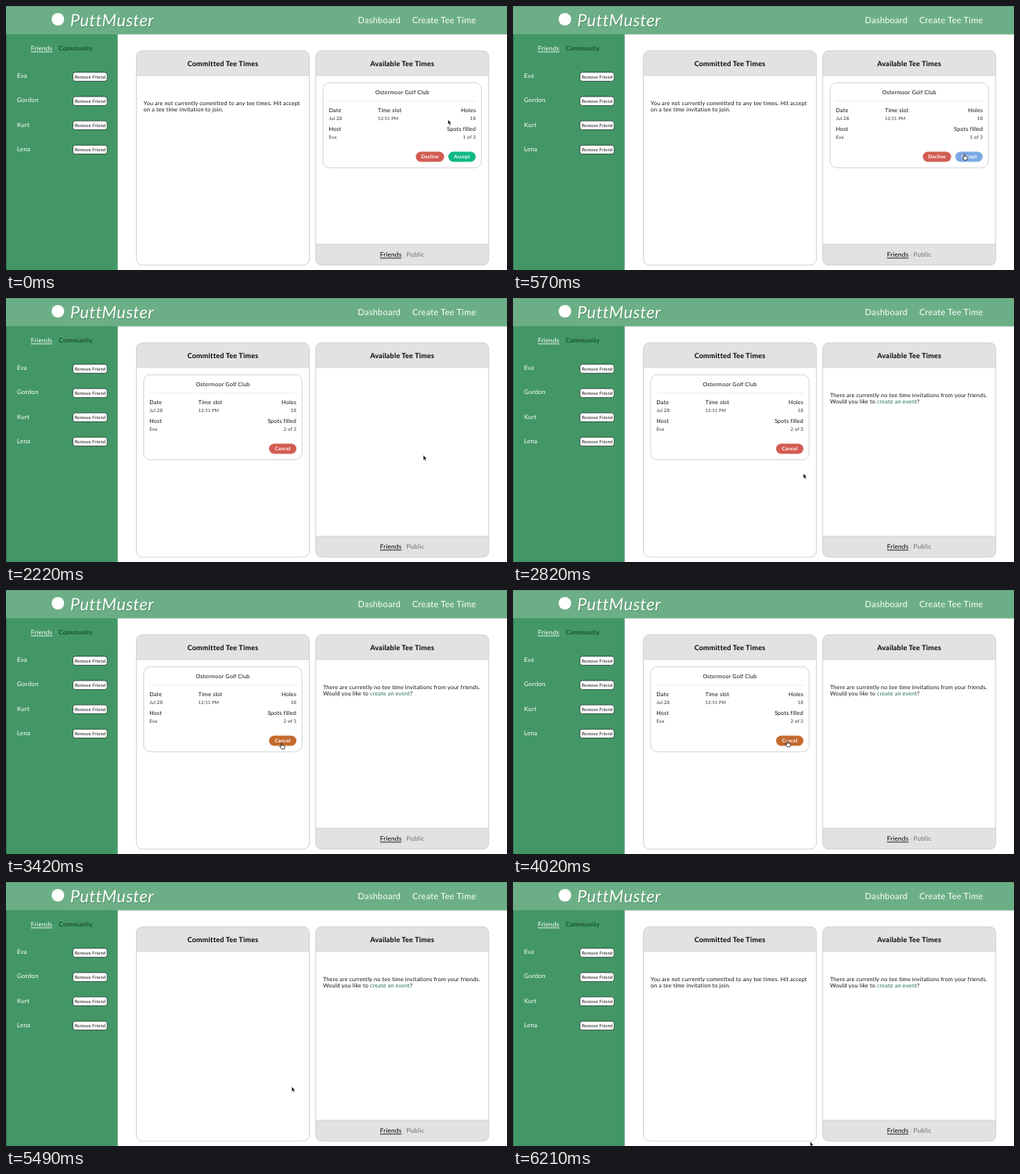
An HTML page for the animation above (6.24 s loop, 640 px wide and 338 px high).

```html
<!DOCTYPE html>
<html lang="en">
<head>
<meta charset="utf-8">
<title>Tee times</title>
<style>
  html, body { margin: 0; width: 100%; height: 100%; overflow: hidden; background: #fff; }
  svg { display: block; width: 640px; height: 338px; }
  text {
    font: 400 7.2px Lato, "Open Sans", sans-serif;
    letter-spacing: .0235em;
    text-rendering: geometricPrecision;
    fill: #111;
  }
  .bold { font-weight: 700; }
  .white { fill: #fff; }
  .under { text-decoration: underline; }
  .mid { text-anchor: middle; }
  .end { text-anchor: end; }
  .soft { filter: drop-shadow(0 .6px .6px rgba(0, 0, 0, .2)); }
</style>
</head>
<body>
<svg id="stage" viewBox="0 0 640 338" xmlns="http://www.w3.org/2000/svg"></svg>
<script>
const LOOP = 6240;
const JOIN = 1740, NO_INVITES = 2400, LEAVE = 4920, NO_PLANS = 5550;
const RED = '#d25c52', GREEN = '#0fb983', BLUE = '#7ba9e5', ORANGE = '#c5692d';
const GREY = '#e3e1e2';
const PITCH = 229.2;

const label = (x, y, str, size = 7.2, cls = '', style = '') =>
  `<text x="${x}" y="${y}" class="${cls}" style="font-size:${size}px;${style}">${str}</text>`;

const box = (x, y, w, h, r, attrs) =>
  `<rect x="${x}" y="${y}" width="${w}" height="${h}" rx="${r}" ${attrs}/>`;

const group = (id, body, x = 0) => `<g id="${id}" transform="translate(${x} 0)">${body}</g>`;

const pill = (id, x, w, str, color) =>
  box(x, 186.5, w, 13, 6.5, `id="${id}" fill="${color}"`) +
  label(x + w / 2, 195.3, str, 6.4, 'bold white mid');

function friend(name, i) {
  const y = 90.6 + i * 31.1;
  return label(14, y + 1.7, name, 8, 'white') +
    box(85.5, y - 5.7, 43.7, 11.4, 3, 'fill="#fff" stroke="#1c3b2a" stroke-width=".8"') +
    label(107.4, y + 2.1, 'Remove Friend', 5.75, 'mid');
}

function panel(x, title, foot) {
  const edge = 'fill="none" stroke="#d0d0d0" stroke-width=".9"';
  return box(x, 57.3, 221, 274.6, 8, 'fill="#fff" class="soft"') +
    `<path d="M${x} 89V65.3q0-8 8-8h205q8 0 8 8V89z" fill="${GREY}"/>` +
    (foot ? `<path d="M${x} 305v18.9q0 8 8 8h205q8 0 8-8V305z" fill="${GREY}"/>` +
      `<path d="M${x} 305h221" ${edge}/>` : '') +
    `<path d="M${x} 89h221" ${edge}/>` +
    box(x, 57.3, 221, 274.6, 8, edge) +
    label(x + 110.5, 76.6, title, 9, 'bold mid', 'fill:#000');
}

// Drawn in the left panel's coordinates.
const card = (spots, buttons) =>
  box(176, 98.3, 202, 108.6, 8, 'fill="#fff" stroke="#dadada" stroke-width=".9" class="soft"') +
  label(277, 113, 'Ostermoor Golf Club', 7.2, 'mid') +
  '<path d="M183 121.7H371" stroke="#e4e4e4" stroke-width=".8"/>' +
  label(183.3, 136.1, 'Date') + label(183.3, 145.7, 'Jul 28', 6.1, '', 'fill:#333') +
  label(245.8, 136.1, 'Time slot') + label(245.8, 145.7, '12:51 PM', 5.8, '', 'fill:#333') +
  label(371, 136.1, 'Holes', 7.2, 'end') + label(371, 145.7, '18', 6.1, 'end', 'fill:#333') +
  label(183.3, 160.1, 'Host') + label(183.3, 169.9, 'Eva', 6.1, '', 'fill:#333') +
  label(371, 160.1, 'Spots filled', 7.2, 'end') +
  label(371, 169.9, spots, 6.1, 'end', 'fill:#333') + buttons;

const topBar =
  box(0, 0, 640, 36.3, 0, 'fill="#6caf86" class="soft"') +
  box(0, 0, 640, 1, 0, 'fill="#00301a" opacity=".12"') +
  '<circle cx="66.3" cy="17" r="8" fill="#fff"/>' +
  label(82.7, 26.7, 'PuttMuster', 21.6, '', 'font-style:italic;fill:rgba(20,70,40,.35)') +
  label(82, 26, 'PuttMuster', 21.6, 'white', 'font-style:italic') +
  label(449.5, 21.8, 'Dashboard', 11, 'white') +
  label(519, 21.8, 'Create Tee Time', 11, 'white');

const sideBar =
  box(0, 36, 142.6, 302, 0, 'fill="#439766" class="soft"') +
  box(0, 36, 1, 302, 0, 'fill="#00301a" opacity=".3"') +
  label(31.7, 57.4, 'Friends', 8.2, 'white under') +
  '<path d="M63.8 50.5v8" stroke="#5fa67d" stroke-width=".7"/>' +
  label(67.3, 57.4, 'Community', 8.2, '', 'fill:#0d3a22') +
  ['Eva', 'Gordon', 'Kurt', 'Lena'].map(friend).join('');

const footer =
  label(477.8, 321.4, 'Friends', 8.2, 'under', 'fill:#000') +
  '<path d="M508.8 314.5v8.5" stroke="#cfcdce" stroke-width=".7"/>' +
  label(511.5, 321.4, 'Public', 8.2, '', 'fill:#6f6d6e');

const noPlans =
  label(175.8, 126.5, 'You are not currently committed to any tee times. Hit accept') +
  label(175.8, 135.3, 'on a tee time invitation to join.');

const noInvites =
  label(405, 126.5, 'There are currently no tee time invitations from your friends.') +
  label(405, 135.3, 'Would you like to <tspan fill="#23704a">create an event</tspan>?');

const arrow = '<path d="M0 0v6.2l1.4-1.2 1 2.3 1.1-.5-1-2.2h1.9z" ' +
  'fill="#000" stroke="#fff" stroke-width=".5"/>';
const hand = '<path d="M-.7 .6q.7-1 1.3 0V3.2l2.6.5q1 .3.8 1.4L3.4 8H-.2L-2.4 5q-.3-1 .6-.9l1.1.8z" ' +
  'fill="#fff" stroke="#000" stroke-width=".7" stroke-linejoin="round"/>';

const stage = document.getElementById('stage');
stage.innerHTML = sideBar + topBar +
  panel(166.5, 'Committed Tee Times', false) + panel(395.7, 'Available Tee Times', true) + footer +
  group('noPlans', noPlans) + group('noInvites', noInvites) +
  group('invite', card('1 of 3',
    pill('decline', 294.3, 36.2, 'Decline', RED) + pill('accept', 335.8, 35, 'Accept', GREEN)), PITCH) +
  group('plan', card('2 of 3', pill('cancel', 336, 35, 'Cancel', RED))) +
  group('cursor', group('arrow', arrow) + group('hand', hand));

const el = id => document.getElementById(id);
const [noPlansEl, noInvitesEl, invite, plan, accept, cancel, cursor, arrowEl, handEl] =
  ['noPlans', 'noInvites', 'invite', 'plan', 'accept', 'cancel', 'cursor', 'arrow', 'hand'].map(el);

// Pointer stops: time, x, y
const path = [
  [0, 564.7, 145.6], [30, 564.7, 145.6], [600, 577, 191], [1230, 578, 192], [1530, 578, 192],
  [1740, 576, 193], [2220, 533.2, 201.3], [2340, 515, 208], [2600, 448, 231], [2820, 371, 224.7],
  [3020, 361, 214], [3300, 353, 197], [3640, 350.5, 193], [4290, 350.5, 192.7], [4920, 351, 194.2],
  [5040, 351, 194.2], [5490, 365, 262], [5850, 374, 296.5], [6120, 374, 296.5], [6210, 379.6, 332.3],
  [LOOP, 379.6, 332.3]
];

function pointer(t) {
  const i = path.findIndex(p => p[0] > t);
  const [t0, x0, y0] = path[i - 1], [t1, x1, y1] = path[i];
  const u = (t - t0) / (t1 - t0), k = u * u * (3 - 2 * u) * .3 + u * .7;
  return [x0 + (x1 - x0) * k, y0 + (y1 - y0) * k];
}

const show = (node, on) => { node.style.display = on ? '' : 'none'; };

function draw(t) {
  const [x, y] = pointer(t);
  const joined = t >= JOIN && t < LEAVE;
  const over = left => x > left && x < left + 35 && y > 186.5 && y < 199.5;
  const onAccept = t < JOIN && over(335.8 + PITCH);
  const onCancel = joined && over(336);

  show(invite, t < JOIN);
  show(plan, joined);
  show(noPlansEl, t < JOIN || t >= NO_PLANS);
  show(noInvitesEl, t >= NO_INVITES);
  accept.setAttribute('fill', onAccept ? BLUE : GREEN);
  cancel.setAttribute('fill', onCancel ? ORANGE : RED);
  show(handEl, onAccept || onCancel);
  show(arrowEl, !onAccept && !onCancel);
  cursor.setAttribute('transform', `translate(${x} ${y})`);
}

const start = performance.now();
function tick() {
  draw((performance.now() - start) % LOOP);
  requestAnimationFrame(tick);
}
tick();
</script>
</body>
</html>
```
